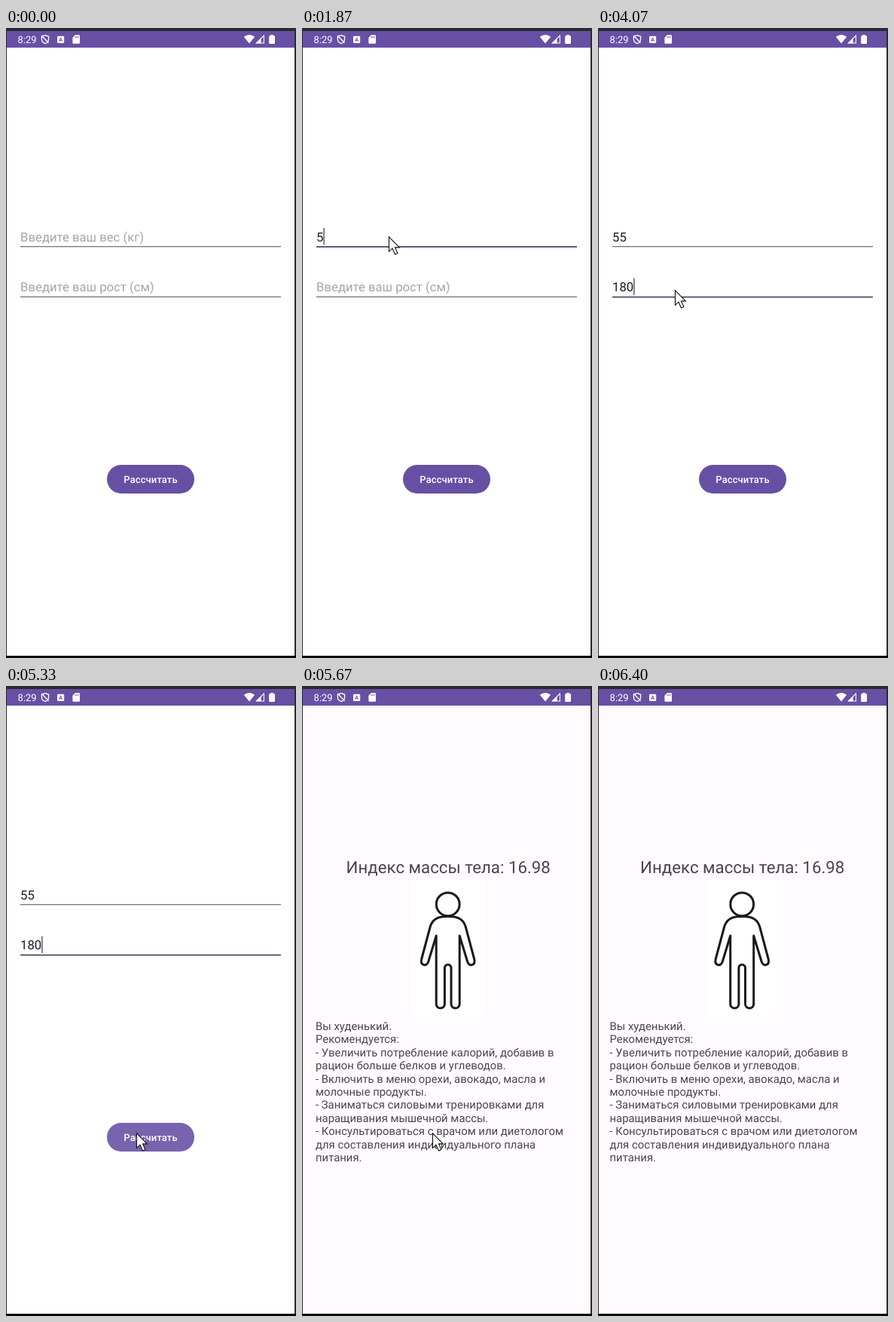
Animation, 385 px wide and 835 px high, one loop 8 s. Source, as an HTML page:

```html
<!DOCTYPE html>
<html lang="ru">
<head>
<meta charset="utf-8">
<title>Индекс массы тела</title>
<style>
  html, body { margin: 0; width: 100%; height: 100%; overflow: hidden; background: #fff; }
  svg { display: block; width: 100%; height: 100%; }
  text { font-family: Roboto, "Open Sans", sans-serif; text-rendering: geometricPrecision; white-space: pre; }
  .field { font-size: 16.71px; }
  .body { font-size: 14.86px; fill: #49454f; }
</style>
</head>
<body>
<svg viewBox="0 0 385 835" xmlns="http://www.w3.org/2000/svg">
  <defs>
    <clipPath id="screen"><rect x="1" y="26" width="382" height="806"/></clipPath>
    <clipPath id="pill"><rect x="134" y="579" width="116" height="38" rx="19"/></clipPath>
    <path id="half" d="M0 305.5H-3C-15 305.5 -21 311 -23.5 319L-35 362C-37 370.5 -28.5 372.5 -26 365.5L-15.5 331V421.5A5.6 5.6 0 0 0 -4.3 421.5V373.5A4.3 4.3 0 0 1 0 369.2"/>
  </defs>

  <rect width="385" height="835" fill="#2b2a30"/>
  <rect x="1" y="26" width="382" height="806" fill="#fff"/>

  <g clip-path="url(#screen)">
    <g id="form">
      <g id="weight"></g>
      <g id="height"></g>
      <rect x="134" y="579" width="116" height="38" rx="19" fill="#6750a4"/>
      <g clip-path="url(#pill)"><circle id="ripple" cx="173" cy="592" fill="#fff"/></g>
      <text x="192" y="602.8" text-anchor="middle" font-size="13" font-weight="500" letter-spacing="0.09" fill="#fff">Рассчитать</text>
    </g>
    <g id="result">
      <rect x="-20" y="26" width="500" height="806" fill="#fffbff"/>
      <text x="191.7" y="248" text-anchor="middle" font-size="22.28" fill="#49454f">Индекс массы тела: 16.98</text>
      <rect x="146" y="255" width="92" height="184" fill="#fff"/>
      <g transform="translate(191.2 0)" fill="none" stroke="#1b1a1b" stroke-width="3" stroke-linejoin="round">
        <circle cy="289.3" r="15.4"/>
        <use href="#half"/>
        <use href="#half" transform="scale(-1 1)"/>
      </g>
      <g id="advice"></g>
    </g>
  </g>

  <!-- status bar -->
  <rect x="1" y="4" width="382" height="22" fill="#6750a4"/>
  <rect y="832" width="385" height="3" fill="#050507"/>
  <text x="15.6" y="19.8" font-size="13" fill="#fff">8:29</text>
  <g fill="none" stroke="#fff" stroke-width="1.3">
    <path d="M52 9.6L56.6 11.3V14.8C56.6 17.6 54.6 19.7 52 20.6C49.4 19.7 47.4 17.6 47.4 14.8V11.3Z"/>
    <path d="M47.2 10L56.6 19.8"/>
  </g>
  <rect x="68" y="10.7" width="9.2" height="9.2" rx="1.2" fill="#fff"/>
  <path d="M70.6 17.8L72.6 12.9L74.6 17.8M71.3 16.4H73.9" fill="none" stroke="#6750a4" stroke-width="1"/>
  <path d="M91.8 9.3H96.8Q98 9.3 98 10.5V19.6Q98 20.8 96.8 20.8H89.6Q88.4 20.8 88.4 19.6V12.7Z" fill="#fff"/>
  <path d="M91.9 11V13.2M93.9 11V13.2M95.9 11V13.2" stroke="#6750a4" stroke-width="0.9"/>
  <path d="M323 20.6L315.8 11.8Q323 6.4 330.2 11.8Z" fill="#fff"/>
  <path d="M332.4 20L342.4 10V20Z" fill="none" stroke="#fff" stroke-width="1.1"/>
  <path d="M332 20.2L338.6 13.6V20.2Z" fill="#fff"/>
  <path d="M351.2 9H355V10.3H356Q357 10.3 357 11.3V20Q357 21 356 21H350.2Q349.2 21 349.2 20V11.3Q349.2 10.3 350.2 10.3H351.2Z" fill="#fff"/>

  <path id="cursor" d="M0.5 0.8V20.3L4.9 16.2L8.5 24L11.9 22.5L8.5 14.9H14.3Z" fill="#fff" stroke="#111" stroke-width="1.1"/>
</svg>
<script>
const NS = "http://www.w3.org/2000/svg";
const LOOP = 8000, TICK = 1000 / 15;
const $ = id => document.getElementById(id);
const clamp = v => Math.max(0, Math.min(1, v));
const ramp = (t, a, b) => clamp((t - a) / (b - a));
const mix = (a, b, k) => a + (b - a) * k;
const within = (t, spans) => spans.some(([a, b]) => t >= a && t < b);

function add(parent, tag, attrs, text = "") {
  const el = document.createElementNS(NS, tag);
  set(el, attrs);
  el.textContent = text;
  parent.appendChild(el);
  return el;
}
function set(el, attrs) {
  for (const k in attrs) el.setAttribute(k, attrs[k]);
}

const LEFT = 19.1, DIGIT = 9.38;

// typed: [time, value]; focus: [gained, lost]; caret: visible spans
const fields = [
  { id: "weight", base: 282.7, hint: "Введите ваш вес (кг)", focus: [1000, 2800],
    typed: [[1865, "5"], [2065, "55"]], caret: [[1000, 1595], [1865, 2590]] },
  { id: "height", base: 349.3, hint: "Введите ваш рост (см)", focus: [2600, 9000],
    typed: [[2995, "1"], [3795, "18"], [4062, "180"]],
    caret: [[2730, 3530], [3795, 4595], [5060, 5595]] }
];
for (const f of fields) {
  const g = $(f.id);
  f.text = add(g, "text", { class: "field", x: LEFT, y: f.base });
  f.line = add(g, "rect", { x: 19, width: 346 });
  f.bar = add(g, "rect", { y: f.base - 17.7, width: 1.5, height: 22.4, fill: "#5f5b66" });
}

[
  "Вы худенький.",
  "Рекомендуется:",
  "- Увеличить потребление калорий, добавив в",
  "рацион больше белков и углеводов.",
  "- Включить в меню орехи, авокадо, масла и",
  "молочные продукты.",
  "- Заниматься силовыми тренировками для",
  "наращивания мышечной массы.",
  "- Консультироваться с врачом или диетологом",
  "для составления индивидуального плана",
  "питания."
].forEach((s, i) => add($("advice"), "text", { class: "body", x: 15.5, y: 456 + i * 17.4 }, s));

// pointer keys: time, x, y
const route = [
  [200, 378, 815], [400, 345, 420], [600, 270, 130], [667, 235, 120],
  [800, 150, 215], [930, 115, 276], [2130, 115, 276], [2400, 101, 354],
  [2600, 102, 347], [4600, 102, 347], [4870, 140, 490], [5130, 173, 592],
  [5740, 173, 592], [6066, 138, 631], [6200, 138, 631], [6333, 101, 723]
];
function pointer(t) {
  const i = route.findIndex(p => p[0] > t);
  if (i < 0) return route[route.length - 1].slice(1);
  const [a, b] = [route[i - 1], route[i]];
  const k = ramp(t, a[0], b[0]);
  return [mix(a[1], b[1], k), mix(a[2], b[2], k)];
}

// two-part bezier: fast start, very slow finish
const bez = (a, b, c, d, s) =>
  a * (1 - s) ** 3 + 3 * b * s * (1 - s) ** 2 + 3 * c * s * s * (1 - s) + d * s ** 3;
function slowIn(x) {
  if (x <= 0 || x >= 1) return clamp(x);
  const [px, py] = x < 1 / 6
    ? [[0, 0.05, 0.13333, 1 / 6], [0, 0, 0.06, 0.4]]
    : [[1 / 6, 0.20833, 0.25, 1], [0.4, 0.82, 1, 1]];
  let lo = 0, hi = 1;
  for (let n = 0; n < 24; n++) {
    const m = (lo + hi) / 2;
    if (bez(...px, m) < x) lo = m; else hi = m;
  }
  return bez(...py, lo);
}

function drawField(f, t) {
  const [on, off] = f.focus;
  const value = f.typed.filter(p => t >= p[0]).map(p => p[1]).pop() || "";
  const focused = t >= on && t < off;
  const grey = Math.round(mix(166, 114, ramp(t, on - 60, on + 67)));
  f.text.textContent = value || f.hint;
  f.text.setAttribute("fill", value ? "#1c1b1f" : `rgb(${grey},${grey},${grey})`);
  set(f.line, {
    y: f.base + (focused ? 6.4 : 6.5),
    height: focused ? 1.8 : 1.1,
    fill: focused ? "#504a6c" : "#5f5963"
  });
  set(f.bar, {
    x: LEFT - 0.1 + DIGIT * value.length,
    visibility: within(t, f.caret) ? "visible" : "hidden"
  });
}

function draw(time) {
  const t = Math.floor((time + 4) / TICK) * TICK;
  fields.forEach(f => drawField(f, t));

  const press = ramp(t, 5190, 5330);
  set($("ripple"), { r: mix(20, 95, press), opacity: press > 0 ? 0.11 : 0 });

  const slide = slowIn((t - 5400) / 450);
  $("form").setAttribute("transform", `translate(${-89 * slide} 0)`);
  set($("result"), {
    transform: `translate(${89 * (1 - slide)} 0)`,
    opacity: ramp(t, 5450, 5533)
  });

  const shown = t >= 199 && t < 6390;
  $("cursor").setAttribute("visibility", shown ? "visible" : "hidden");
  if (shown) {
    const [x, y] = pointer(Math.max(t, 200));
    $("cursor").setAttribute("transform", `translate(${x} ${y})`);
  }
}

const start = performance.now();
function loop() {
  draw((performance.now() - start) % LOOP);
  requestAnimationFrame(loop);
}
loop();
</script>
</body>
</html>
```
